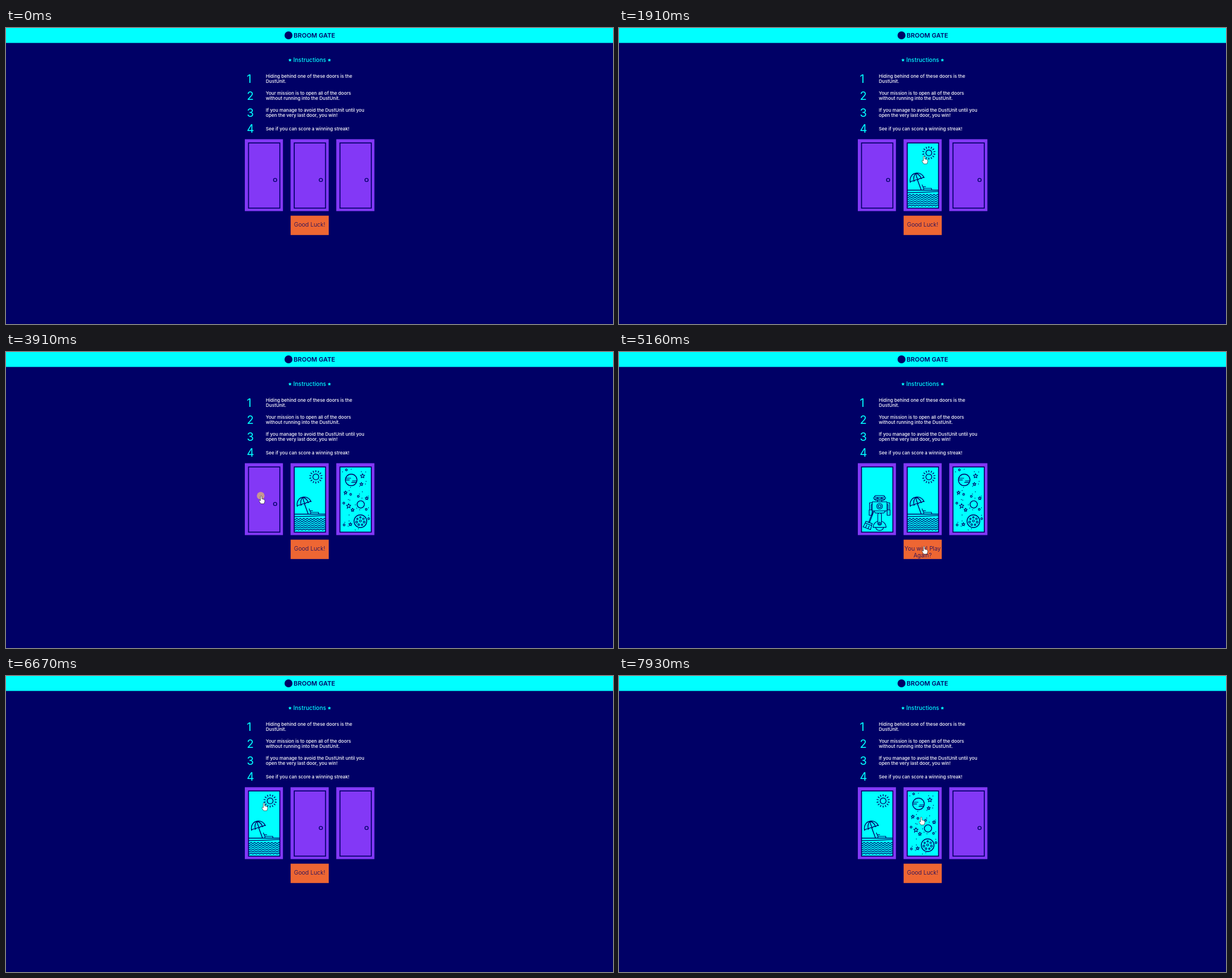
These frames come from a looping animation (1070x523 px, 8 s). An HTML page:

```html
<!DOCTYPE html>
<html lang="en">
<head>
<meta charset="utf-8">
<title>Broom Gate</title>
<style>
  html, body { margin: 0; width: 100%; height: 100%; overflow: hidden; background: #000066; }
  svg { display: block; width: 1070px; height: 523px; font-family: Inter, "Open Sans", sans-serif; }
  .line { fill: none; stroke: #000066; stroke-width: 1.4; stroke-linejoin: round; }
  .thin { stroke-width: 1.15; }
  .cyan { fill: #00ffff; }
  .navy { fill: #000066; }
  .num { font-size: 20px; }
  .rule { font-size: 8.15px; font-weight: 500; fill: #fff; }
  .mid { text-anchor: middle; }
  .btn { font-size: 10px; font-weight: 300; letter-spacing: .15px; }
  .logo { font-size: 11px; font-weight: 600; }
  .title { font-size: 10px; font-weight: 500; letter-spacing: .12px; }
</style>
</head>
<body>
<svg id="stage" viewBox="0 0 1070 523" xmlns="http://www.w3.org/2000/svg"></svg>
<script>
const LOOP = 8000;
const STEP = 68; // the cursor moves in steps of about this many ms
const NAVY = 'class="navy" stroke="none"';

const circle = (x, y, r, extra = '') => `<circle cx="${x}" cy="${y}" r="${r}" ${extra}/>`;
const rect = (x, y, w, h, extra = '') => `<rect x="${x}" y="${y}" width="${w}" height="${h}" ${extra}/>`;
const path = (d, extra = '') => `<path d="${d}" ${extra}/>`;
const text = (x, y, cls, s) => `<text x="${x}" y="${y}" class="${cls}">${s}</text>`;
const group = (attrs, s) => `<g ${attrs}>${s}</g>`;
const repeat = (n, fn) => Array.from({ length: n }, (_, i) => fn(i)).join('');

function polar(x, y, r, turn) {
  const a = (turn - .25) * 2 * Math.PI;
  return `${(x + r * Math.cos(a)).toFixed(2)} ${(y + r * Math.sin(a)).toFixed(2)}`;
}

const star = (x, y, r, extra = '') =>
  `<polygon points="${repeat(10, i => polar(x, y, i % 2 ? r * .48 : r, i / 10) + ' ')}" ${extra}/>`;

function randomizer(seed) {
  return () => (seed = seed * 16807 % 2147483647) / 2147483647;
}

// Scenes use coordinates relative to the top left corner of a door.
function beach() {
  const sun = circle(44.6, 24.2, 5.2) +
    repeat(14, i => path(`M${polar(44.6, 24.2, 8.3, i / 14)}L${polar(44.6, 24.2, 11.7, i / 14)}`));
  const umbrella = path('M11.7 76C10.6 67 14.8 61.2 21.6 60C28 58.8 33.6 62 36.3 67.8Q33.6 66.5 31.4 69.7Q28.2 68.2 25.2 71.8Q21.6 70.3 18.6 74Q14.8 72.7 11.7 76Z') +
    path('M21.6 60Q16.2 66 18.6 74M21.6 60Q22.2 66 25.2 71.8M21.6 60Q28.6 62.4 31.4 69.7M24.4 71.6L31.2 90');
  const chair = path('M32.5 80.3L35.4 86.7H49.4V90M35.4 86.7V90M34.6 84H39.2');
  const shore = path('M6.5 90H61.5M6.5 94.4Q30 94.2 61.5 92.4');
  const sea = repeat(6, row =>
    path(`M6.5 ${98.6 + row * 3.7}` + repeat(9, () => 'q1.55 2 3.05 0t3.05 0')));
  return sun + umbrella + shore + group('class="thin"', chair + sea);
}

function space() {
  const rand = randomizer(11);
  const planets = [[26.3, 29.5, 10.2], [43.1, 72.8, 6.4], [42.5, 102.5, 11.2]];
  const stars = [[46.3, 22.5], [21.8, 75.5], [44.3, 37], [16.3, 52], [28.8, 82.5], [53.8, 62], [24.8, 108]];
  const rings = [[17.8, 11.7], [25.3, 55], [38.8, 58.5], [13.3, 70.5], [52.8, 81.5], [57.1, 98], [13.8, 109]];
  const craters = circle(42.5, 102, 1.8) + repeat(7, i => {
    const [x, y] = polar(42.5, 102.5, 6.8, i / 7).split(' ');
    return circle(x, y, 1.3 + i % 3 * .2);
  });
  // one speck per cell of a loose grid, kept off the planets
  const specks = repeat(36, i => {
    const x = 11 + (i % 4 + rand()) * 11.6, y = 10 + (Math.floor(i / 4) + rand()) * 12;
    const free = planets.every(([px, py, r]) => Math.hypot(x - px, y - py) > r + 2);
    return free ? circle(x, y, .75, NAVY) : '';
  });
  return planets.map(p => circle(...p)).join('') +
    group('class="thin"',
      path('M16.6 26.5H26M17 29.6H23.6M28 31.2H36.4M26.6 33.8H35.6') + craters +
      stars.map(([x, y], i) => star(x, y, i < 2 ? 4 : 3)).join('') +
      rings.map(([x, y]) => circle(x, y, 1.6)).join('')) + specks;
}

function robot() {
  const mid = 38.4;
  const head = rect(29.4, 57, 18, 8.4, 'rx="3"') + rect(27.8, 60, 21.2, 3, 'rx="1.5" class="cyan"') +
    path('M33 62.8q1.8 -3 3.6 0M40.2 62.8q1.8 -3 3.6 0');
  const body = rect(25.4, 68.2, 26, 16) + circle(mid, 76, 5) + circle(mid, 76, 2.5);
  const side = path('M34.6 65.4V68.2M25.4 70H20.6V82.5M25.4 73H23.6V82.5M20 82.5H25.2V92H20ZM28 84.2L31 88H38.4');
  const mirror = group(`transform="translate(${2 * mid} 0) scale(-1 1)"`, side);
  const wheel = path('M27 113.4A11.4 11.4 0 0 1 49.8 113.4Z') + path('M31.4 113.4A7.2 7.2 0 0 0 45.4 113.4');
  const leg = rect(35.2, 88, 6.4, 21.4, 'rx="3" class="cyan"') + circle(mid, 106, 1.6);
  const broom = group('transform="translate(27 86) rotate(21)"',
    rect(-.8, 0, 1.6, 20) + rect(-6, 20, 12, 3.4) + path('M-6 23.4L-7 31H7L6 23.4M-2.4 25V31M2.4 25V31'));
  return group('class="thin"', head + body + side + mirror + wheel + leg + broom);
}

const SCENES = { beach: beach(), space: space(), robot: robot() };

function door(kind) {
  const open = kind !== 'closed';
  return rect(0, 0, 67.2, 127, 'fill="#8338f6"') +
    (open ? rect(6.5, 6.6, 55.2, 115.2, 'class="cyan"') : '') +
    group('class="line"', open ? SCENES[kind] : circle(53.4, 72, 2.9)) +
    rect(6.5, 6.6, 55.2, 115.2, 'class="line" style="stroke-width:1.7;stroke-linejoin:miter"');
}

const RULES = [
  [89.3, 'Hiding behind one of these doors is the', 'DustUnit.'],
  [119.5, 'Your mission is to open all of the doors', 'without running into the DustUnit.'],
  [149.7, 'If you manage to avoid the DustUnit until you', 'open the very last door, you win!'],
  [177.8, 'See if you can score a winning streak!']
];

const rule = ([y, ...lines], i) => text(424.6, y + 7.3, 'num cyan', i + 1) +
  lines.map((l, k) => text(458, y + 2.8 + 9.1 * (k - (lines.length - 1) / 2), 'rule', l)).join('');

const stage = document.getElementById('stage');
stage.innerHTML =
  rect(0, 0, 1070, 523, 'class="navy"') + rect(0, 0, 1070, 26.4, 'class="cyan"') +
  circle(498, 13, 7, 'class="navy"') + text(507, 17, 'logo navy', 'BROOM GATE') +
  text(535.4, 59.6, 'title cyan mid', 'Instructions') +
  star(500.6, 56.8, 3.1, 'class="cyan"') + star(570, 56.8, 3.1, 'class="cyan"') +
  RULES.map(rule).join('') +
  repeat(3, i => group(`class="door" transform="translate(${421 + 80.6 * i} 196.5)"`, '')) +
  rect(501.7, 331.6, 67.2, 34.2, 'fill="#ee6633"') + group('id="label"', '') +
  circle(0, 0, 6.8, 'id="press" fill="#ffe640" fill-opacity=".55"') +
  group('fill="#fff" stroke="#111" stroke-width=".6" stroke-linejoin="round"',
    path('M0 0V9.4L2.2 7.4L3.7 10.7L5.2 10L3.7 6.8H6.7Z', 'id="arrow"') +
    path('M-.5 1Q.7 -.6 1.9 1V5.4L5.7 6.4Q7.2 6.9 7.1 8.4V10.6L5.7 14.1H.1L-2.7 9.6Q-3.3 8.2 -1.9 7.8L-.5 8.9Z', 'id="hand"'));

const START = { x: 832, y: 460, time: 140 };
// from, until, x, y
const MOVES = [
  [210, 280, 724, 230], [580, 650, 719, 230], [1080, 1220, 577, 217],
  [1400, 1600, 537, 226], [2160, 2550, 611, 254], [3410, 3790, 449, 254],
  [4210, 4280, 451, 259], [4660, 5160, 537, 343], [5910, 6170, 454, 224],
  [6850, 7250, 520, 247], [7930, 7930, 532, 249]
];
// press, release, doors after the release
const CLICKS = [
  [0, 0, 'closed closed closed'],
  [1780, 1910, 'closed beach closed'],
  [2660, 2780, 'closed beach space'],
  [3910, 4030, 'robot beach space'],
  [5660, 5710, 'closed closed closed'],
  [6540, 6670, 'beach closed closed'],
  [7610, 7690, 'beach space closed']
];

const doors = [...stage.querySelectorAll('.door')];
const [label, press, arrow, hand] = ['label', 'press', 'arrow', 'hand'].map(id => document.getElementById(id));
const ease = p => p * p * (3 - 2 * p);

function cursorAt(t) {
  let { x, y } = START;
  for (const [from, until, tx, ty] of MOVES) {
    if (t < from) break;
    const last = Math.round((until - from) / STEP);
    const done = t >= until ? last : Math.floor((t - from) / (until - from) * last);
    const p = ease((done + 1) / (last + 1));
    x += (tx - x) * p;
    y += (ty - y) * p;
  }
  return [x, y];
}

let shown = '';
function showDoors(kinds) {
  if (kinds === shown) return;
  shown = kinds;
  kinds.split(' ').forEach((kind, i) => doors[i].innerHTML = door(kind));
  const lines = kinds.includes('closed') ? ['Good Luck!'] : ['You win! Play', 'Again?'];
  label.innerHTML = lines.map((l, i) => text(535.3, 351.4 + i * 11.7, 'btn navy mid', l)).join('');
}

function draw(t) {
  showDoors(CLICKS.filter(c => c[1] <= t).pop()[2]);
  const [x, y] = cursorAt(t);
  const overGame = x > 421 && x < 650 && y > 196 && y < 366;
  for (const el of [press, arrow, hand]) el.setAttribute('transform', `translate(${x} ${y})`);
  const show = (el, on) => el.setAttribute('visibility', on ? 'visible' : 'hidden');
  show(press, CLICKS.some(([down, up]) => t >= down && t < up));
  show(arrow, t >= START.time && !overGame);
  show(hand, t >= START.time && overGame);
}

const began = performance.now();
function tick() {
  draw((performance.now() - began) % LOOP);
  requestAnimationFrame(tick);
}
tick();
</script>
</body>
</html>
```
